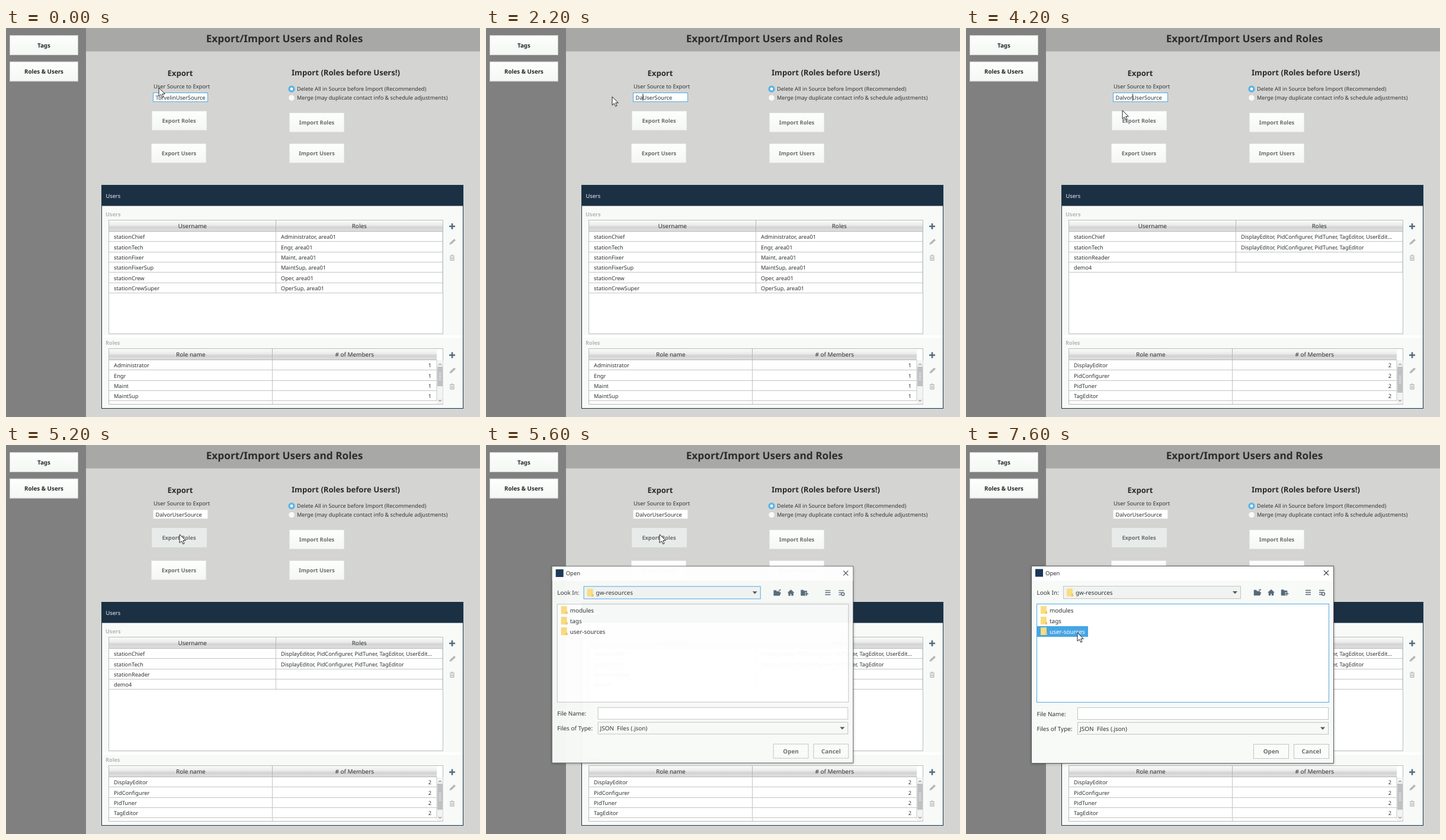
An HTML page that plays this animation: 800 by 657 pixels, repeating every 8000 ms.

```html
<!DOCTYPE html>
<html lang="en">
<head>
<meta charset="utf-8">
<title>Export/Import Users and Roles</title>
<style>
html, body { margin: 0; width: 100%; height: 100%; overflow: hidden; }
svg { display: block; }
text { font-family: "Noto Sans", "Open Sans", sans-serif; white-space: pre; text-rendering: geometricPrecision; }
.b { font-weight: 700; }
.m { text-anchor: middle; }
.e { text-anchor: end; }
#dialog { transform-origin: 365.5px 371px; filter: drop-shadow(0 1px 2px #0004); }
</style>
</head>
<body>
<svg id="stage" width="800" height="657" viewBox="0 0 800 657"></svg>
<script>
const stage = document.getElementById("stage");
const $ = id => document.getElementById(id);

// Markup helpers
const SMALL = 9.22, MEDIUM = 9.95;
const rect = (x, y, w, h, fill, stroke = "none", extra = "") =>
  `<rect x="${x}" y="${y}" width="${w}" height="${h}" fill="${fill}" stroke="${stroke}" ${extra}/>`;
const box = (x, y, r, b, fill, stroke, extra) =>
  rect(x + .5, y + .5, r - x - 1, b - y - 1, fill, stroke, extra);
const path = (d, stroke, width = 1, fill = "none", extra = "") =>
  `<path d="${d}" stroke="${stroke}" stroke-width="${width}" fill="${fill}" ${extra}/>`;
const text = (x, y, str, size = SMALL, cls = "", fill = "#303234", extra = "") =>
  `<text x="${x}" y="${y}" class="${cls}" style="font-size:${size}px;fill:${fill}" ${extra}>${str}</text>`;
const button = (x, y, w, h, label, textX, id = "") =>
  box(x, y, x + w, y + h, "url(#btn)", "#e6e8e6", id && `id="${id}"`) +
  text(textX, y + h / 2 + 3.5, label, SMALL, "b m", "#6b6e6f");
const menuButton = (y, label) => box(6, y, 122, y + 34, "url(#btn)", "#c4c5c4") +
  text(64, y + 20.8, label, 9.8, "b m", "#26282a");
const group = (id, body) => `<g id="${id}">${body}</g>`;

const SLATE = "#566a7a", LINE = "#c3c5c5", BLUE = "#4fa9e2", NAVY = "#1c3044";

const plus = y => path(`M748 ${y}h10M753 ${y - 5}v10`, SLATE, 2.6);
const pencil = y => path(`M749 ${y + 4}l1-3 6.500-6 2 2-6.500 6z`, "#a9afb3", .8, "#b4babd");
const trash = y => path(`M749 ${y - 3}h8M751.500 ${y - 4.500}h3M750 ${y - 2}v6.500h6v-6.500M752 ${y - 1}v4M754 ${y - 1}v4`, "#a4abb0", 1);
const tools = y => plus(y) + pencil(y + 26.5) + trash(y + 53);
const folder = (x, y) => rect(x, y, 10, 13, "#fbdd80") + path(`M${x + 8} ${y + 13}v-4h3v4z`, "none", 0, "#efc55a");
const arrow = (x, y) => path(`M${x - 4} ${y - 2}h8l-4 4.500z`, "none", 0, "#55585a");

function rows(top, left, right, split, data, numeric) {
  return data.map(([a, b], i) => {
    const y = top + 17.35 * i;
    return text(182, y + 12.2, a) +
      (numeric ? text(718, y + 12.2, b, SMALL, "e") : text(464, y + 12.2, b)) +
      path(`M${left} ${Math.round(y + 17.35) - .5}H${right}M${split} ${y}v17.350`, LINE);
  }).join("") + path(`M${right} ${top}v${17.35 * data.length}`, LINE);
}
const header = (y, h, right, split, a, b) =>
  rect(174, y, right - 174, h, "url(#head)") + path(`M${split} ${y}v${h}M174 ${y + h}H${right}`, "#b4b6b6") +
  text((174 + split) / 2, y + 13.2, a, MEDIUM, "m") + text((split + right) / 2, y + 13.2, b, MEDIUM, "m");
const thumb = h => rect(728, 572, 9, h, "#bfc1c2") +
  [-6, -3, 0, 3, 6].map(d => path(`M730.500 ${572 + h / 2 + d}h4`, "#eef0f0")).join("");

const usersA = [
  ["stationChief", "Administrator, area01"], ["stationTech", "Engr, area01"],
  ["stationFixer", "Maint, area01"], ["stationFixerSup", "MaintSup, area01"],
  ["stationCrew", "Oper, area01"], ["stationCrewSuper", "OperSup, area01"]];
const editorRoles = "DisplayEditor, PidConfigurer, PidTuner, TagEditor";
const usersB = [["stationChief", editorRoles + ", UserEdit..."], ["stationTech", editorRoles],
  ["stationReader", ""], ["demo4", ""]];
const rolesA = ["Administrator", "Engr", "Maint", "MaintSup"].map(r => [r, 1]);
const rolesB = ["DisplayEditor", "PidConfigurer", "PidTuner", "TagEditor"].map(r => [r, 2]);
const users = data => rows(344, 174, 737, 455.5, data);
const roles = (data, h) => rows(561, 174, 727, 449.5, data, true) + thumb(h);

const newFolderPlus = "M538.500 251h6M541.500 248v6";
const dialog =
  box(110, 204, 621, 538, "#f8faf8", "#595c5e") + rect(111, 205, 509, 24, "#fefffe") +
  rect(117, 209.5, 13, 13, "#183858") + text(134, 220, "Open", 9.5) +
  path("M604 212l8 8M612 212l-8 8", "#3a3d3f", 1.1) +
  text(119.5, 253, "Look In:", MEDIUM) +
  box(164, 238, 464, 260, "#f0f3f2", BLUE, 'id="combo"') +
  folder(170, 242.5) + text(185, 253, "gw-resources", MEDIUM) + arrow(454, 249) +
  // toolbar icons
  path("M486 254v-9h4l1 2h5v2h2l-2 5z", SLATE, .5, SLATE) + path("M494 245h3v-2", SLATE, 1.3) +
  path("M509.500 249l5.500-5 5.500 5h-1.500v5h-3v-3h-2v3h-3v-5z", SLATE, .5, SLATE) +
  path("M532 254v-9.500h4l1 1.500h5v8z", SLATE, .5, SLATE) +
  path(newFolderPlus, "#f8faf8", 3.4) + path(newFolderPlus, SLATE, 1.7) +
  path("M573 245.500h9M573 249h9M573 252.500h9", SLATE, 1.5) +
  path("M596 245.500h9M596 249h5M596 252.500h4", SLATE, 1.4) +
  `<circle cx="603" cy="251.500" r="2.500" fill="none" stroke="${SLATE}" stroke-width="1.500"/>` +
  box(119, 268, 613, 435, "#fefffe", LINE, 'id="list"') +
  rect(119.5, 306, 86.5, 18, "#45a5e4", "none", 'id="pick"') +
  ["modules", "tags", "user-sources"].map((name, i) =>
    folder(126, 272 + 18 * i) + text(141, 282.5 + 18 * i, name, MEDIUM, "", "#303234", `id="item${i}"`)).join("") +
  text(119.5, 457.5, "File Name:", MEDIUM) + box(188, 443, 612, 464, "#fefffe", LINE) +
  text(119.5, 482.5, "Files of Type:", MEDIUM) + box(188, 468, 612, 489, "#f7f9f7", LINE) +
  text(192, 482.5, "JSON  Files (.json)", MEDIUM) + arrow(602, 478.5) +
  [[485, "Open"], [553, "Cancel"]].map(([x, label]) =>
    box(x, 505, x + 60, 530, "#fafcfa", LINE) + text(x + 30, 521, label, MEDIUM, "b m", "#6b6e6f")).join("");

stage.innerHTML = `<defs>
  <linearGradient id="btn" x2="0" y2="1"><stop stop-color="#fdfefd"/><stop offset="1" stop-color="#f4f7f4"/></linearGradient>
  <linearGradient id="head" x2="0" y2="1"><stop stop-color="#fbfbfb"/><stop offset=".45" stop-color="#e9eae9"/><stop offset=".6" stop-color="#d2d3d2"/><stop offset="1" stop-color="#dfe0df"/></linearGradient>
  <clipPath id="fieldClip"><rect x="250" y="109" width="86" height="16"/></clipPath></defs>` +
  rect(0, 0, 800, 657, "#d4d5d2") + rect(0, 0, 135, 657, "#808080") + rect(135, 0, 665, 39.5, "#a8a8a6") +
  text(470, 23.5, "Export/Import Users and Roles", 17.25, "b m", "#2a2c2e") +
  menuButton(12, "Tags") + menuButton(56.5, "Roles &amp; Users") +
  text(294, 80.5, "Export", 13.1, "b m", "#2a2c2e") +
  text(482, 80, "Import (Roles before Users!)", 13.1, "b", "#2a2c2e") +
  text(249, 102, "User Source to Export", 9.3) +
  box(248, 109, 341, 125, "#fefffe", BLUE, 'id="field"') +
  `<g clip-path="url(#fieldClip)">${rect(252, 110.5, 0, 13, "#45a5e4", "none", 'id="sel"')}` +
  text(252.5, 120.5, "", SMALL, "", "#303234", 'id="entry"') +
  rect(252, 111, 1, 12, "#202224", "none", 'id="caret"') + "</g>" +
  `<circle cx="482" cy="103" r="5.700" fill="#5db2e8"/><circle cx="482" cy="103" r="2.400" fill="#fff"/>
   <circle cx="482" cy="118" r="5.400" fill="#f8faf8" stroke="#c6c8c6" stroke-width=".8"/>` +
  text(491, 106.3, "Delete All in Source before Import (Recommended)", 9.15) +
  text(491, 121.3, "Merge (may duplicate contact info &amp; schedule adjustments)", 9.15) +
  button(246, 140, 93, 33, "Export Roles", 292, "exportRoles") +
  button(245, 195, 93, 33, "Export Users", 292) +
  button(478, 143, 93, 33, "Import Roles", 524.5) +
  button(478, 195, 93, 33, "Import Users", 524.5) +
  // users and roles panel
  box(161, 265, 772, 643, "#f8faf8", NAVY) + rect(161, 265, 611, 35.5, NAVY) +
  text(168.5, 286.5, "Users", SMALL, "", "#f2f4f5") +
  text(168, 317.5, "Users", 9.1, "b", "#b1b6b8") + text(168, 535, "Roles", 9.1, "b", "#b1b6b8") +
  rect(162, 519, 609, 4, "#fff") +
  box(173, 324, 738, 517, "#fefffe", "#b9bbbb") + header(325, 18.5, 737, 455.5, "Username", "Roles") +
  group("usersA", users(usersA)) + group("usersB", users(usersB)) + tools(335) +
  box(173, 541, 738, 636, "#fefffe", "#b9bbbb") + header(542, 18.5, 727, 449.5, "Role name", "# of Members") +
  rect(727.5, 561, 10, 74, "#f2f4f3") +
  path("M730 569.500l2.500-2.500 2.500 2.500M730 628l2.500 2.500 2.500-2.500", "#55585a") +
  group("rolesA", roles(rolesA, 33)) + group("rolesB", roles(rolesB, 44)) + tools(552.5) +
  path("M449.500 631v4", LINE) +
  group("dialog", dialog) +
  group("pointer", path("M0 0V14.300L3.400 11.300L5.700 16.300L8 15.200L5.700 10.300H10.200Z", "#202224", 1, "#fff")) +
  group("beam", path("M-2.500 -6.500h5M0 -6.500v13M-2.500 6.500h5", "#202224"));

// Each state holds until the next key time
const pointerKeys = [[0, 258, 101], [200, 276, 108], [400, 291, 117, 1], [1000, 272, 117, 1],
  [1200, 236, 117], [1400, 220, 117], [1600, 213, 116], [3800, 225, 121], [4000, 245, 130], [4200, 264, 139],
  [4400, 280, 146], [4600, 290, 150], [4800, 293, 151], [5800, 286, 168], [6000, 260, 232],
  [6200, 233, 292], [6400, 219, 300], [6600, 201, 311], [6800, 188, 317]];
const typedKeys = [[2000, 1], [2200, 2], [2400, 3], [2600, 5], [2800, 6]];
const selectKeys = [[0, 8], [1000, 4], [1200, 1], [1400, 0]];
const fadeKeys = [[0, 0, .95], [5400, .135, .957], [5600, .97, .997], [5800, 1, 1]];
const at = (keys, t) => keys.reduce((hit, key) => key[0] <= t ? key : hit, [0, 0, 0]);
const show = (id, on) => $(id).style.display = on ? "" : "none";

function drawField(t) {
  const typed = at(typedKeys, t)[1];
  const start = typed ? "Dalvor".slice(0, typed) : "Torvelin";
  const from = typed ? start.length : at(selectKeys, t)[1];
  const entry = $("entry");
  entry.innerHTML = `${start.slice(0, from)}<tspan fill="#fff">${start.slice(from)}</tspan>UserSource`;
  const xAt = n => 252.5 + (n ? entry.getSubStringLength(0, n) : 0);
  const focused = t < 5200;
  $("sel").setAttribute("x", xAt(from));
  $("sel").setAttribute("width", xAt(start.length) - xAt(from));
  $("caret").setAttribute("x", xAt(from));
  show("caret", focused && t >= 600 && !(t >= 3200 && t < 3400));
  $("field").setAttribute("stroke", focused ? BLUE : "#e2e4e2");
}

function draw(t) {
  const [, x, y, beam] = at(pointerKeys, t);
  for (const id of ["pointer", "beam"]) $(id).setAttribute("transform", `translate(${x} ${y})`);
  show("beam", beam);
  show("pointer", !beam);
  drawField(t);
  show("usersA", t < 3200);
  show("usersB", t >= 3200);
  show("rolesA", t < 3400);
  show("rolesB", t >= 3400);
  $("exportRoles").setAttribute("fill", t < 4600 ? "url(#btn)" : "#e7ebea");

  const [, alpha, scale] = at(fadeKeys, t);
  show("dialog", alpha > 0);
  $("dialog").style.opacity = alpha;
  $("dialog").style.transform = `scale(${scale})`;
  const picked = t >= 7600;
  const hovered = t >= 6000 && t < 6400;
  show("pick", picked);
  $("item2").style.fill = picked ? "#fff" : "#303234";
  $("list").setAttribute("stroke", picked ? BLUE : LINE);
  $("combo").setAttribute("stroke", picked ? LINE : BLUE);
  $("combo").setAttribute("fill", hovered ? "#e7ebeb" : "#f0f3f2");
}

function frame() {
  draw(performance.now() % 8000);
  requestAnimationFrame(frame);
}
frame();
</script>
</body>
</html>
```
